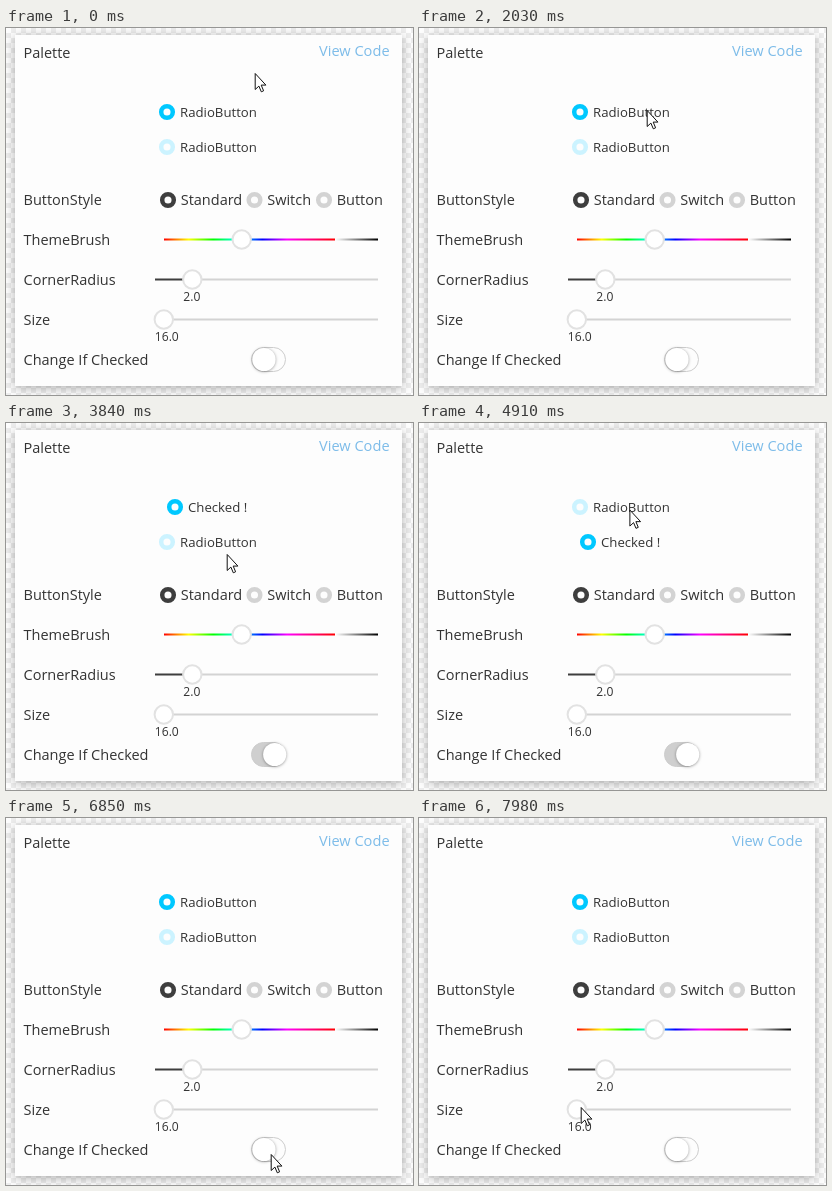
Write an HTML page with a canvas that moves like this. It is 407 px wide and 367 px high and loops after 8000 ms.

```html
<!DOCTYPE html>
<html lang="en">
<head>
<meta charset="utf-8">
<title>Palette</title>
<style>
html, body { margin: 0; width: 100%; height: 100%; overflow: hidden; background: #fff; }
canvas { display: block; }
</style>
</head>
<body>
<canvas id="stage" width="407" height="367"></canvas>
<script>
const ctx = document.getElementById('stage').getContext('2d');
const LOOP = 8000, TOGGLE_MS = 280;
const DARK = '#3e3e3e', GREY = '#d3d3d3', CYAN = '#00c8ff', PALE = '#ccf3ff';
const LABELS = ['ButtonStyle', 'ThemeBrush', 'CornerRadius', 'Size', 'Change If Checked'];
const HUES = ['#f00', '#ff0', '#0f0', '#0ff', '#00f', '#f0f'];
const TRACK_END = 372;

// Moments of the pointer's clicks
const click = { second: 1090, first: 2030, on: 3310, secondAgain: 4580, firstAgain: 5550, off: 6570 };

const home = { x: 249, y: 45 };
const move = (from, to, x, y) => ({ from, to, x, y });
const moves = [
  move(100, 680, 219, 123),
  move(click.second, 1570, 228, 82),
  move(click.first, 2780, 247, 277),
  move(2800, 3130, 260, 330),
  move(3480, 3840, 221, 131),
  move(3840, 3940, 210, 105),
  move(4090, 4270, 204, 119),
  move(click.secondAgain, 4960, 211, 85),
  move(click.firstAgain, 6210, 265, 336),
  move(6940, 7320, 222, 279),
  move(7340, 7700, 153, 287),
  move(7720, 7980, 162, 289)
];

const row = i => 171.5 + 40 * i;
const between = (t, a, b) => t >= a && t < b;
const progress = (t, a, b) => Math.min(1, Math.max(0, (t - a) / (b - a)));
const smooth = s => s * s * (3 - 2 * s);
const settle = (t, start) => 1 - (1 - progress(t, start, start + TOGGLE_MS)) ** 3;

function pointerAt(t) {
  return moves.reduce((p, m) => {
    const s = smooth(progress(t, m.from, m.to));
    return { x: p.x + (m.x - p.x) * s, y: p.y + (m.y - p.y) * s };
  }, home);
}

function text(str, x, y, size = 14.5, color = '#333') {
  ctx.font = `${size}px "Open Sans", "Noto Sans", sans-serif`;
  ctx.fillStyle = color;
  ctx.fillText(str, x, y);
}

function bar(x1, x2, y, fill) {
  ctx.fillStyle = fill;
  ctx.fillRect(x1, y - 1, x2 - x1, 2);
}

function disc(x, y, r, fill, stroke, width) {
  ctx.beginPath();
  ctx.arc(x, y, r, 0, Math.PI * 2);
  if (fill) { ctx.fillStyle = fill; ctx.fill(); }
  if (stroke) { ctx.strokeStyle = stroke; ctx.lineWidth = width; ctx.stroke(); }
}

const ring = (x, y, color) => disc(x, y, 5.8, null, color, 4.5);
const thumb = (x, y) => disc(x, y, 9.2, '#fff', '#e2e2e2', 2);

function shadow(color, blur, dy) {
  ctx.shadowColor = color;
  ctx.shadowBlur = blur;
  ctx.shadowOffsetY = dy;
}

function backdrop() {
  const cell = 5;
  ctx.fillStyle = '#fff';
  ctx.fillRect(0, 0, 407, 367);
  ctx.fillStyle = '#efefef';
  for (let y = 0; y < 74; y++)
    for (let x = (y + 1) % 2; x < 82; x += 2) ctx.fillRect(x * cell, y * cell, cell, cell);
  ctx.save();
  shadow('rgba(0,0,0,.32)', 11, 2);
  ctx.fillStyle = '#fdfdfd';
  ctx.fillRect(9, 7, 387, 351);
  ctx.restore();
}

function radio(y, checked, special) {
  const shift = checked && special ? 8 : 0;
  ring(161 + shift, y, checked ? CYAN : PALE);
  text(shift ? 'Checked !' : 'RadioButton', 174 + shift, y + 5, 13.2);
}

function styleOption(name, x, color) {
  ring(x, row(0) + 0.5, color);
  text(name, x + 12.7, row(0) + 5.5);
}

function hueSlider() {
  const left = 158, hues = ctx.createLinearGradient(left, 0, TRACK_END, 0);
  HUES.forEach((c, i) => hues.addColorStop(i * 0.115, c));
  hues.addColorStop(0.8, '#f00');
  hues.addColorStop(0.8, '#fff');
  hues.addColorStop(1, '#000');
  bar(left, TRACK_END, row(1), hues);
  thumb(235.7, row(1));
}

function slider(y, x, value) {
  bar(149, x, y, DARK);
  bar(x, TRACK_END, y, GREY);
  thumb(x, y);
  text(value, x - 9, y + 21.5, 12.1);
}

function toggle(on) {
  const y = row(4);
  ctx.beginPath();
  ctx.roundRect(245.5, y - 12, 34, 24, 12);
  ctx.fillStyle = `rgba(207,207,207,${on})`;
  ctx.fill();
  ctx.strokeStyle = '#cdcdcd';
  ctx.lineWidth = 1;
  ctx.stroke();
  ctx.save();
  shadow('rgba(0,0,0,.4)', 3, 0.5);
  disc(258 + 10.7 * on, y, 11.6, '#fff');
  ctx.restore();
}

const arrow = new Path2D('M0 0V16L3.7 12.6L6.1 18.3L8.4 17.3L6 11.6H10.7Z');

function pointer({ x, y }) {
  ctx.save();
  ctx.translate(x + 0.2, y + 0.5);
  ctx.fillStyle = '#fff';
  ctx.fill(arrow);
  ctx.strokeStyle = '#111';
  ctx.lineWidth = 1;
  ctx.stroke(arrow);
  ctx.restore();
}

function draw(t) {
  backdrop();
  text('Palette', 17.5, 30);
  text('View Code', 313, 28, 14.6, '#7dbce9');

  const second = between(t, click.second, click.first) || between(t, click.secondAgain, click.firstAgain);
  const special = between(t, click.on, click.off);
  radio(84, !second, special);
  radio(119, second, special);

  LABELS.forEach((label, i) => text(label, 17.5, row(i) + 5.5));
  styleOption('Standard', 162, DARK);
  styleOption('Switch', 248.5, GREY);
  styleOption('Button', 318, GREY);
  hueSlider();
  slider(row(2), 186.3, '2.0');
  slider(row(3), 157.8, '16.0');
  toggle(settle(t, click.on) - settle(t, click.off));
  pointer(pointerAt(t));
}

const start = performance.now();
function frame() {
  draw((performance.now() - start) % LOOP);
  requestAnimationFrame(frame);
}
frame();
</script>
</body>
</html>
```
